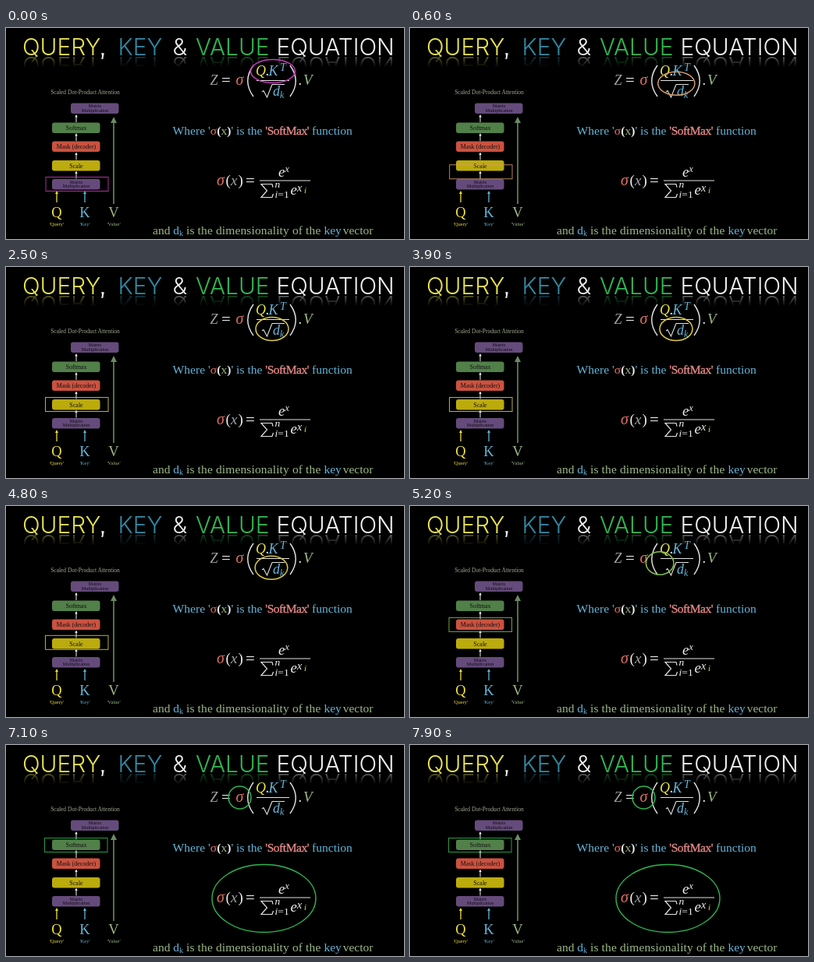
Animation, 510 px wide and 271 px high, one loop 8000 ms. Source, as an HTML page:

```html
<!DOCTYPE html>
<html lang="en">
<head>
<meta charset="utf-8">
<title>Query, Key &amp; Value Equation</title>
<style>
html, body { margin: 0; width: 100%; height: 100%; overflow: hidden; background: #000; }
svg { display: block; width: 100vw; height: 100vh; }
text { font-family: "Liberation Serif", "Noto Serif", serif; fill: #f0f0f0; white-space: pre; }
#title text { font: 300 29.8px Inter, Roboto, sans-serif; }
.i { font-style: italic; }
.m { text-anchor: middle; }
.line { fill: none; stroke: #e4e4e4; }
svg .y { fill: #e6e250; } svg .b { fill: #66b4d8; } svg .g { fill: #9cb888; }
svg .r { fill: #e27062; } svg .w { fill: #f0f0f0; } svg .n { fill: #a2a2a2; }
.p { fill: #ea8c8a; stroke: #ea8c8a; stroke-width: .3; letter-spacing: -.5px; }
.bold { font-weight: bold; }
</style>
</head>
<body>
<svg viewBox="0 0 510 271">
  <defs>
    <linearGradient id="fade" x2="0" y2="1">
      <stop offset="0" stop-opacity=".6"/><stop offset=".6" stop-opacity="1"/>
    </linearGradient>
    <g id="title">
      <text x="21" y="35.2" class="y">QUERY<tspan class="w">,</tspan></text>
      <text x="143.5" y="35.2" style="fill:#3188a2">KEY</text>
      <text x="213.5" y="35.2">&amp;</text>
      <text x="243" y="35.2" style="fill:#31b552">VALUE</text>
      <text x="346.5" y="35.2">EQUATION</text>
    </g>
  </defs>

  <use href="#title" transform="matrix(1 0 0 -1 0 72)"/>
  <rect y="36" width="510" height="24" fill="url(#fade)"/>
  <use href="#title"/>

  <g id="diagram"></g>

  <g class="i" font-size="18">
    <text x="261.5" y="73" class="n">Z</text>
    <text x="276" y="74" font-size="21" font-style="normal">=</text>
    <text x="294.5" y="73" class="r" font-size="20">σ</text>
    <text x="320" y="61" class="y">Q<tspan class="w">.</tspan></text>
    <text x="336.5" y="61" class="b">K</text>
    <text x="351" y="55" class="b" font-size="14">T</text>
    <text x="342" y="87" class="b">d<tspan font-size="12" dy="3">k</tspan></text>
    <text x="375" y="73">.</text>
    <text x="381" y="73" class="g" font-size="19">V</text>
    <path class="line" d="M321 67.5H363M341 72.5H357" stroke-width="1"/>
    <path class="line" d="M328 82l2-1.5 4.5 8.5 6.5-16.5" stroke-width="1.1"/>
    <path class="line" d="M317 48Q302.5 68 317 88M364 48Q378.5 68 364 88" stroke-width="1.4"/>
  </g>

  <text x="213.5" y="137" font-size="15.6" class="b">Where '<tspan class="r">σ</tspan><tspan class="w bold">(</tspan><tspan class="g">x</tspan><tspan class="w bold">)</tspan>' is the <tspan class="p">'SoftMax'</tspan> function</text>

  <g font-size="19">
    <text x="270" y="202" class="r i" font-size="20">σ</text>
    <text x="281.5" y="202">(</text>
    <text x="288" y="202" class="n i">x</text>
    <text x="297.5" y="202">)</text>
    <text x="307" y="203" font-size="21">=</text>
    <text x="349" y="190.5" class="i">e<tspan font-size="12" dy="-5.5">x</tspan></text>
    <path class="line" d="M325 196H390" stroke-width="1"/>
    <path class="line" d="M342 204.5l-1-4H327l7.5 8.5L327 217.5H341l1.5-4.5" stroke-width="1.2"/>
    <text x="344.5" y="205" class="i" font-size="13.5">n</text>
    <text x="344.5" y="218" font-size="13.5"><tspan class="i">i</tspan>=1</text>
    <text x="364.5" y="213.5" class="i">e<tspan font-size="14" dy="-4">x</tspan></text>
    <text x="382" y="212" class="i y" font-size="11">i</text>
  </g>

  <text x="188" y="265" font-size="15.5" class="g">and <tspan class="b">d<tspan font-size="10" dy="2">k</tspan></tspan><tspan dy="-2" letter-spacing=".13"> is the dimensionality of the </tspan><tspan class="b">key</tspan><tspan word-spacing="-2"> vector</tspan></text>

  <g fill="none">
    <rect id="box" stroke-width="1" stroke-opacity=".85"/>
    <ellipse id="ring" stroke-width="1.5"/>
    <ellipse id="big" cx="330.5" cy="197" rx="66.5" ry="43.5" stroke="#2fb551" stroke-width="1.4"/>
  </g>
</svg>
<script>
const $ = id => document.getElementById(id);

const label = (x, y, size, s, fill) =>
  `<text class="m" x="${x}" y="${y}" font-size="${size}" style="fill:${fill}">${s}</text>`;
const block = (x, y, fill, ...rows) =>
  `<rect x="${x}" y="${y}" width="61.5" height="13.5" rx="3" fill="${fill}"/>` +
  (rows.length > 1
    ? rows.map((s, i) => label(x + 31, y + 5.5 + i * 5.5, 6, s, '#0c0a10')).join('')
    : label(x + 31, y + 9.5, 8, rows[0], '#111'));
const arrow = (x, from, to, fill, width = 1, head = 2) =>
  `<path d="M${x} ${from}V${to + head}" stroke="${fill}" stroke-width="${width}"/>` +
  `<path d="M${x - head} ${to + head * 2}h${head * 2}l${-head} ${-head * 2}z" fill="${fill}"/>`;
const input = (x, letter, name, fill) =>
  label(x, 243, 18.5, letter, fill) + label(x, 254, 6.5, `'${name}'`, fill);

const purple = '#654b7b', yellow = '#eee03c', blue = '#66b4d8', green = '#9cb888';
$('diagram').innerHTML =
  label(101.5, 85, 7.5, 'Scaled Dot-Product Attention', '#a3aa92') +
  block(83, 96.5, purple, 'Matrix', 'Multiplication') +
  block(59, 121.5, '#528049', 'Softmax') +
  block(59, 145.5, '#cb523f', 'Mask (decoder)') +
  block(59, 170, '#bcab0d', 'Scale') +
  block(59, 194, purple, 'Matrix', 'Multiplication') +
  [121, 145, 169.5, 193.5].map(y => arrow(90, y, y - 10, '#f0f0f0', 1, 1.7)).join('') +
  arrow(65, 224, 209, yellow, 1.3) +
  arrow(101, 224, 209, blue, 1.3) +
  arrow(138, 226, 114, '#6d8a64', 1.6, 4) +
  input(65, 'Q', 'Query', yellow) + input(101, 'K', 'Key', blue) + input(138, 'V', 'Value', green);

// box: x, y, width, height; ring: cx, cy, rx, ry; color: r, g, b
const poses = [
  { box: [51, 191.5, 80, 18], ring: [342, 55.5, 28.5, 15], color: [200, 60, 186] },
  { box: [50.5, 167.5, 80.5, 18], ring: [341, 79.5, 21, 15], color: [222, 206, 62] },
  { box: [49.5, 119.5, 80.5, 18], ring: [299.5, 67.5, 14.5, 14.5], color: [47, 181, 81] }
];
const moves = [0, 4700], moveTime = 1000;

const clamp = v => Math.min(1, Math.max(0, v));
const ease = v => (1 - Math.cos(Math.PI * clamp(v))) / 2;
const set = (el, names, values) => names.forEach((n, i) => el.setAttribute(n, values[i]));

function draw(t) {
  const step = t < moves[1] ? 0 : 1;
  const k = ease((t - moves[step]) / moveTime);
  const mix = key => poses[step][key].map((a, i) => a + (poses[step + 1][key][i] - a) * k);
  const color = `rgb(${mix('color').map(Math.round)})`;
  set($('box'), ['x', 'y', 'width', 'height'], mix('box'));
  set($('ring'), ['cx', 'cy', 'rx', 'ry'], mix('ring'));
  $('box').setAttribute('stroke', color);
  $('ring').setAttribute('stroke', color);
  $('big').setAttribute('opacity', clamp((t - 5650) / 550));
}

const start = performance.now();
function frame() {
  draw((performance.now() - start) % 8000);
  requestAnimationFrame(frame);
}
frame();
</script>
</body>
</html>
```
